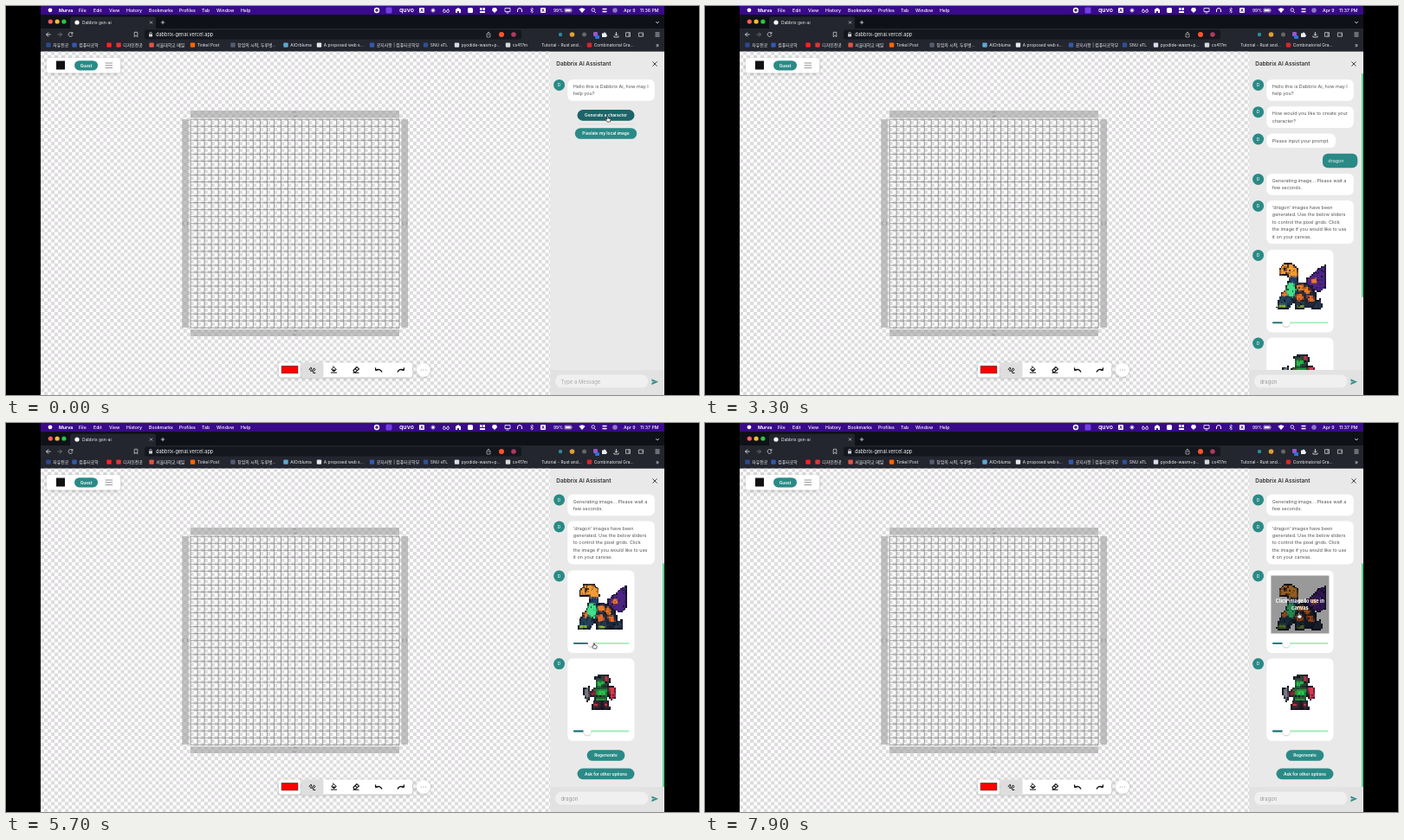
An HTML page with a canvas that plays this animation: 800 by 450 pixels, repeating every 8 s.

```html
<!DOCTYPE html>
<html lang="en">
<head>
<meta charset="utf-8">
<title>Pixel assistant</title>
<style>
html, body { margin: 0; width: 100%; height: 100%; overflow: hidden; background: #000; }
canvas { display: block; width: 800px; height: 450px; }
</style>
</head>
<body>
<canvas id="stage" width="800" height="450"></canvas>
<script>
const FONT = 'Inter, "Noto Sans CJK KR", "Noto Sans CJK", sans-serif';
const TEAL = '#2a8a86', DARK_TEAL = '#1c6468';
const LOOP = 8000;
const PAGE_TOP = 52.64;
const screen = document.getElementById('stage').getContext('2d');
let c = screen;

function layer(w, h) {
  const el = document.createElement('canvas');
  el.width = w;
  el.height = h;
  return el.getContext('2d', { willReadFrequently: true });
}
function rect(x, y, w, h, color) {
  c.fillStyle = color;
  c.fillRect(x, y, w, h);
}
function round(x, y, w, h, r, color) {
  c.fillStyle = color;
  c.beginPath();
  c.roundRect(x, y, w, h, r);
  c.fill();
}
function dot(x, y, r, color) {
  c.fillStyle = color;
  c.beginPath();
  c.arc(x, y, r, 0, 7);
  c.fill();
}
function line(path, color, width = 0.8, x = 0, y = 0) {
  c.save();
  c.translate(x, y);
  c.strokeStyle = color;
  c.lineWidth = width;
  c.stroke(new Path2D(path));
  c.restore();
}
function shape(path, color, x = 0, y = 0) {
  c.save();
  c.translate(x, y);
  c.fillStyle = color;
  c.fill(new Path2D(path));
  c.restore();
}
function text(s, x, y, size, color, weight = 400, align = 'left') {
  c.font = `${weight} ${size}px ${FONT}`;
  c.fillStyle = color;
  c.textAlign = align;
  c.textBaseline = 'alphabetic';
  c.fillText(s, x, y + size * 0.36);
}
function shadowed(blur, draw) {
  c.save();
  c.shadowColor = 'rgba(0,0,0,.22)';
  c.shadowBlur = blur;
  c.shadowOffsetY = 1;
  draw();
  c.restore();
}

// Browser and page, drawn once

function menuBar() {
  rect(40, 0, 720, 10, '#390a8a');
  dot(51, 4.8, 2.4, '#fff');
  text('Murva', 61, 4.8, 5.2, '#fff', 700);
  const items = { File: 84, Edit: 101, View: 119, History: 139, Bookmarks: 165, Profiles: 200, Tab: 226, Window: 243, Help: 271 };
  for (const name in items) text(name, items[name], 4.8, 5.2, '#fff', 500);
  dot(428, 5, 3.2, '#fff');
  dot(428, 5, 1.8, '#443070');
  round(438.5, 1.5, 7, 7, 1.5, '#7040e0');
  text('quvo', 454, 4.8, 7, '#fff', 600);
  for (const x of [480, 620]) {
    round(x - 3, 2, 6, 6, 1, '#fff');
    text('A', x, 5, 4.8, '#390a8a', 600, 'center');
  }
  dot(493, 5, 1.5, '#fff');
  line('M-3 0H3M0-3V3M-2-2L2 2M2-2L-2 2', '#fff', 0.5, 493, 5);
  line('M-3.5 1a1.5 1.5 0 1 0 3 0a1.5 1.5 0 1 0-3 0M.5 1a1.5 1.5 0 1 0 3 0a1.5 1.5 0 1 0-3 0M-3 0L-2-2M3 0L2-2', '#fff', 0.7, 508, 5);
  shape('M-3-1L0-3L3-1V3H1V1H-1V3H-3Z', '#fff', 522, 5);
  shape('M-3 1H3V3H-3ZM-3-3H-.5V0H-3ZM.5-3H3V0H.5Z', '#fff', 550, 5);
  shape('M-2-3H2L3 0L0 3L-3 0Z', '#fff', 564, 5);
  round(533, 2, 6, 6, 1.5, '#fff');
  line('M-3-2.5H3V1.5H-3ZM-1.5 3H1.5', '#fff', 0.8, 579, 5);
  line('M-2.5 2V0a2.5 2.5 0 0 1 5 0V2', '#fff', 1, 593, 5);
  line('M-1.7-1.6L1.7 1.6L0 3V-3L1.7-1.6L-1.7 1.6', '#fff', 0.6, 607, 5);
  text('99%', 632, 4.8, 4.9, '#fff', 500);
  line('M-4-2H3.5V2H-4ZM4.5-.7V.7', '#ccc', 0.6, 649, 5);
  rect(645.7, 3.7, 6, 2.6, '#fff');
  shape('M-3.6-1.2Q0-4.4 3.6-1.2L0 3Z', '#fff', 665, 5);
  line('M1.3 1.3L3 3M-2-.5a1.8 1.8 0 1 0 3.6 0a1.8 1.8 0 1 0-3.6 0', '#fff', 0.8, 678, 5);
  line('M-2.5-1.5H2.5M-2.5 1.5H2.5', '#fff', 1.6, 691, 5);
  dot(703, 5, 2.8, '#8a78c8');
}

function addressBar() {
  rect(40, 10, 720, 16, '#0f1118');
  ['#ff5f57', '#febc2e', '#28c840'].forEach((color, i) => dot(51.3 + i * 7.8, 18, 2.6, color));
  round(74, 12.5, 99, 16, 3, '#23252f');
  rect(40, 26, 720, PAGE_TOP - 26, '#23252f');
  dot(82, 19, 2.6, '#fff');
  text('Dabbrix gen-ai', 88, 19, 4.8, '#eee');
  line('M-1.5-1.5L1.5 1.5M1.5-1.5L-1.5 1.5', '#ddd', 0.7, 167.5, 19);
  line('M-2.2 0H2.2M0-2.2V2.2', '#ddd', 0.8, 181, 19);
  line('M-2-1L0 1L2-1', '#ddd', 0.8, 752, 19);
  line('M2.5 0H-2.5M0-2.5L-2.5 0L0 2.5', '#ddd', 0.9, 49, 33);
  line('M-2.5 0H2.5M0-2.5L2.5 0L0 2.5', '#777', 0.9, 62, 33);
  line('M2-1.5a2.4 2.4 0 1 0 .4 2M2.4-3V-1H.5', '#ddd', 0.8, 74.5, 33);
  line('M-1.8-2.7H1.8V2.7L0 1.2L-1.8 2.7Z', '#ccc', 0.8, 150, 33);
  round(160, 27.5, 435, 11, 2.5, '#15171e');
  rect(165, 32.3, 4, 3.2, '#ccc');
  line('M-1.2 0V-1a1.2 1.2 0 0 1 2.4 0V0', '#ccc', 0.7, 167, 32.5);
  text('dabbrix-genai.vercel.app', 173, 32.8, 5.6, '#f0f0f0');
  line('M-1-1H-2V3H2V-1H1M0 1V-3M-1.3-1.8L0-3L1.3-1.8', '#bbb', 0.7, 557, 33);
  dot(572, 33, 3, '#fb542b');
  dot(586, 33, 2.8, '#b0395f');
  dot(640, 33, 2.2, '#2a8c98');
  dot(653.5, 33, 2.8, '#e0a030');
  dot(667.5, 33, 2.5, '#666');
  round(678, 30, 5, 5, 1, '#9a55c8');
  round(680, 34, 5, 4, 1, '#2a72e0');
  shape('M-3-1.5H-1a1 1 0 1 1 2 0H2V.3a1 1 0 1 1 0 2V3H-3Z', '#eee', 691, 33);
  line('M0-3V1M-1.8-.6L0 1.2L1.8-.6M-2.6 1.5V3H2.6V1.5', '#eee', 0.8, 704.5, 33);
  line('M-2.5-2.3H2.5V2.3H-2.5ZM1-2.3V2.3', '#ccc', 0.8, 718, 33);
  line('M-2.6-2H2.6V2.2H-2.6ZM.8 0H2.6', '#ccc', 0.8, 733, 33);
  line('M-2.5-2H2.5M-2.5 0H2.5M-2.5 2H2.5', '#ddd', 0.8, 752, 33);

  const bookmarks = [
    ['자유전공', 49, '#2b4a8c'], ['컴퓨터공학', 79, '#3559a8'], ['', 119, '#f22'], ['디자인전공', 130, '#e03535'],
    ['서울대학교 메일', 168, '#e05545'], ['Tinkel Post', 215.5, '#ff6600'], ['창업의 시작, 두루벗...', 262, '#555c70'],
    ['AIOrbluma', 323, '#60a8d0'], ['A proposed web s...', 361.5, '#e8e8e8'], ['공지사항 | 컴퓨터공학부', 422.5, '#3559a8'],
    ['SNU eTL', 484.5, '#305090'], ['pyodide-wasm+p...', 520.5, '#d8dce8'], ['cs417m', 579.5, '#d8d8d8'],
    ['Tutorial - Rust and...', 613, ''], ['Combinatorial Gra...', 673.5, '#d02a2a']
  ];
  for (const [name, x, color] of bookmarks) {
    if (color) round(x - 2.7, 42.4, 5.4, 5.4, 1, color);
    text(name, x + 5.3, 45, 4.9, '#f0f0f0');
  }
  text('»', 752, 45, 7, '#ddd', 400, 'center');
}

function editor() {
  rect(40, PAGE_TOP, 588, 450 - PAGE_TOP, '#fff');
  const half = 4.018;
  for (let j = 0; j < 99; j++)
    for (let i = (j + 1) % 2; i < 147; i += 2) rect(40 + i * half, PAGE_TOP + j * half, half, half, '#dddbdd');

  const bar = 'rgba(160,160,160,.62)';
  rect(213, 121, 241, 8.5, bar);
  rect(213, 374.3, 241, 7.7, bar);
  rect(203.2, 131, 7.8, 241, bar);
  rect(456.3, 131, 7.8, 241, bar);
  for (const y of [125.2, 378]) line('M-2-1.8L0-2.8L2-1.8M-2 1.8L0 2.8L2 1.8', '#777', 0.6, 333.5, y);
  for (const x of [207.2, 460.2]) line('M-1.8-2L-2.8 0L-1.8 2M1.8-2L2.8 0L1.8 2', '#777', 0.6, x, 251.5);
  for (let i = 0; i <= 30; i++) {
    const p = i * 8.035;
    line(`M${213 + p} 131V372.5M213 ${131.2 + p}H454`, '#686868', 0.62);
  }

  shadowed(4, () => round(47, 60, 85, 17.5, 3, '#fff'));
  round(58, 63.5, 10, 10, 0, '#111');
  round(79, 63.2, 27, 11.2, 5.6, TEAL);
  text('Guest', 92.5, 68.8, 4.8, '#fff', 600, 'center');
  line('M114.5 66H123M114.5 68.8H123M114.5 71.6H123', '#777', 0.8);

  shadowed(4, () => {
    round(315, 412.5, 25.5, 17, 2, '#fff');
    round(341, 412.5, 128, 17, 2, '#fff');
    dot(482, 421, 8, '#fff');
  });
  round(341, 412.5, 25.5, 17, 2, '#dedede');
  rect(317.8, 416.2, 19.4, 9, '#333');
  rect(318.3, 416.7, 18.4, 8, '#f00');
  const ink = '#111';
  line('M-3.5 0C-2-4 0-3 -1-1S-3 2 0 1M0 1L2-2L3.5-.6L1 2.5ZM1 3.5H3.8', ink, 1, 353.5, 421);
  line('M-2.8 0L0-2.8L2.8 0L0 2.2ZM-1.5-3.8L0-2.8M-3.6 3.6H3.6', ink, 1, 378.5, 420.5);
  shape('M-2.8 0H2.8L0 2.4Z', ink, 378.5, 420.5);
  line('M-3 1L1-3L3.5-.6L-.5 3H-2ZM-1-1L1.6 1.4M-3.5 3.8H3.5', ink, 1.1, 404, 420.5);
  line('M4 2.5Q2-2-3 0M-3.5-2.6L-3.2.3L-.3 0', ink, 1.3, 430, 421);
  line('M-4 2.5Q-2-2 3 0M3.5-2.6L3.2.3L.3 0', ink, 1.3, 456, 421);
  for (const x of [479.3, 482, 484.7]) dot(x, 421, 0.6, '#888');
}

// Pixel art: polygons on a 67-unit square, reduced to n x n cells

const dragon = [
  ['M62 13L56 16L50 22L42 28L42 33L48 39L56 42L62 37Z', '#4c2482'],
  ['M26 37L34 32L42 34L50 44L52 56L45 60L31 60L25 50Z', '#20283c'],
  ['M10 17L15 11L24 11L30 16L31 24L28 28L21 27L20 22L10 23Z', '#f29a36'],
  ['M22 25L29 25L31 32L27 38L20 36Z', '#23406a'],
  ['M20 32L26 31L29 40L26 50L20 48L17 42Z', '#3fe088'],
  ['M10 50L18 44L25 54L20 61L8 61Z', '#24425a'],
  ['M29 36L36 34L39 40L32 42ZM41 36L46 41L43 46L38 42Z', '#ef7a26'],
  ['M28 46L35 44L38 51L31 54ZM41 47L48 46L50 54L44 54Z', '#e0692a'],
  ['M30 54H39V61H29ZM50 57L57 52L58 61H48Z', '#263a4c'],
  ['M9 57H17V61H8ZM31 58H38V61H31Z', '#86b336'],
  ['M12 45L17 41L19 46L15 49ZM46 29L51 26L53 32L48 34Z', '#ef7a26'],
  ['M15 14H18V18H15Z', '#20202e']
];
const warrior = [
  ['M28 16L32 14L40 14L43 19L42 27H29Z', '#2c4038'],
  ['M38 15H42V20H38Z', '#d02e48'],
  ['M29 20H37V24H34V27H29Z', '#28b548'],
  ['M25 29H42L40 43H28Z', '#26903e'],
  ['M43 28L49 28L50 39L45 41Z', '#d83a50'],
  ['M21 33L27 30L28 36L22 38Z', '#8c2438'],
  ['M15 29L19 28L20 40L18 43L15 37Z', '#787c80'],
  ['M26 43H33V53H23ZM36 43H41L43 53H36Z', '#30282c'],
  ['M25 46H30V49H25ZM37 46H41V49H37Z', '#b83446'],
  ['M31 32H38V36H31Z', '#30cc50'],
  ['M27 38H40V40H27Z', '#202a26']
];
const hash = (x, y) => { const v = Math.sin(x * 12.99 + y * 78.23) * 43758.5; return v - Math.floor(v); };
const sprites = new Map();

function sprite(name, parts, n) {
  const key = name + n;
  if (sprites.has(key)) return sprites.get(key);
  const g = layer(n, n);
  g.scale(n / 67, n / 67);
  g.strokeStyle = '#17182a';
  g.lineWidth = 2.4;
  for (const [path] of parts) g.stroke(new Path2D(path));
  for (const [path, color] of parts) {
    g.fillStyle = color;
    g.fill(new Path2D(path));
  }
  const image = g.getImageData(0, 0, n, n), d = image.data;
  for (let i = 0; i < d.length; i += 4) {
    d[i + 3] = d[i + 3] > 120 ? 255 : 0;
    const cell = i / 4, h = hash(cell % n, Math.floor(cell / n));
    const shade = h < 0.05 ? 0.35 : h < 0.2 ? 0.75 : 1;
    for (let k = 0; k < 3; k++) d[i + k] *= shade;
  }
  g.putImageData(image, 0, 0);
  sprites.set(key, g.canvas);
  return g.canvas;
}

// Chat panel

function avatar(y) {
  dot(638.6, y + 6.4, 6.5, TEAL);
  text('D', 638.6, y + 6.4, 4.8, '#e8f4f3', 500, 'center');
}
function message(y, lines, width = 100.5) {
  avatar(y);
  round(648.3, y, width, lines.length * 8.4 + 8, 6, '#fff');
  lines.forEach((s, i) => text(s, 654.8, y + 8.1 + i * 8.4, 5.45, '#555'));
}
function button(label, y, pointer) {
  c.font = `600 4.82px ${FONT}`;
  const w = c.measureText(label).width + 17;
  const hover = pointer && Math.abs(pointer.x - 692.5) < w / 2 && Math.abs(pointer.y - y) < 7;
  round(692.5 - w / 2, y - 6.3, w, 12.6, 6.3, hover ? DARK_TEAL : TEAL);
  text(label, 692.5, y, 4.82, '#fff', 600, 'center');
}
function card(y, name, parts, thumb, hover) {
  avatar(y);
  round(648.3, y, 77.2, 95.5, 6, '#fff');
  const n = Math.round(20 + 64 * (thumb - 655) / 64);
  c.imageSmoothingEnabled = false;
  c.drawImage(sprite(name, parts, n), 653.4, y + 6, 67, 67);
  if (hover) {
    rect(653.4, y + 6, 67, 67, 'rgba(0,0,0,.4)');
    text('Click image to use in', 686.9, y + 35, 5.6, '#fff', 700, 'center');
    text('canvas', 686.9, y + 43.4, 5.6, '#fff', 700, 'center');
  }
  round(655, y + 83.4, 64.5, 1.8, 0.9, '#a2edb8');
  round(655, y + 83.4, thumb - 655, 1.8, 0.9, '#176a74');
  shadowed(1.5, () => dot(thumb, y + 84.3, 4.6, '#fff'));
}

const clamp = v => Math.max(0, Math.min(1, v));
const ease = v => v * v * (3 - 2 * v);
const ramp = (t, a, b) => ease(clamp((t - a) / (b - a)));

const route = [
  [0, 695, 131], [550, 695, 131], [950, 694, 161], [1500, 694, 161], [1800, 690, 434],
  [4900, 692, 300], [5250, 674, 258], [5450, 674, 258], [6450, 707, 258], [6650, 707, 258],
  [7200, 674, 258], [7300, 674, 258], [7600, 686, 223], [LOOP, 686, 223]
];
function pointerAt(t) {
  const i = route.findIndex(k => k[0] > t);
  const [a, ax, ay] = route[i - 1], [b, bx, by] = route[i];
  const p = ramp(t, a, b);
  return { x: ax + (bx - ax) * p, y: ay + (by - ay) * p };
}

function hand({ x, y }) {
  const path = 'M-1-3.2Q-.3-4 .3-3.2V-1Q3.2-.9 3 .6L2.4 3H-1L-2.8.4Q-2.6-.6-1 .2Z';
  shape(path, '#fff', x, y);
  line(path, '#222', 0.7, x, y);
}

function panel(t, pointer) {
  const results = t >= 3300;
  const scroll = 90 * ramp(t, 3300, 3600) + 21.5 * ramp(t, 3850, 4250);
  const focused = t >= 1800 && t < 2700;
  rect(628, PAGE_TOP, 132, 450 - PAGE_TOP, '#e9e9e9');

  c.save();
  c.beginPath();
  c.rect(628, 78, 132, 343);
  c.clip();
  c.translate(0, -scroll);
  message(85, ['Hello this is Dabbrix Ai, how may I', 'help you?']);
  if (t < 500) {
    button('Generate a character', 126.4, pointer);
    line('M660 136.5H726', '#d2d2d2', 0.5);
    button('Pixelate my local image', 147.5);
  } else {
    message(116.3, ['How would you like to create your', 'character?']);
    if (t < 1500) {
      button('Generate character with prompt', 157.6, pointer);
      button('Extract character from my image', 179);
    } else {
      message(147.6, ['Please input your prompt.'], 79.7);
    }
  }
  if (t >= 2700) {
    round(713, 170.8, 40.3, 16.4, 6, TEAL);
    text('dragon', 719.3, 179, 5.45, '#e8f4f3');
    message(194, ['Generating image... Please wait a', 'few seconds.']);
  }
  if (results) {
    message(225, ["'dragon' images have been", 'generated. Use the below sliders', 'to control the pixel grids. Click', 'the image if you would like to use', 'it on your canvas.']);
    const thumb = t > 5450 && t < 7200 ? pointer.x - 3 : 671;
    card(282, 'dragon', dragon, thumb, t >= 7500);
    card(383.7, 'warrior', warrior, 671, false);
    button('Regenerate', 496, pointer);
    button('Ask for other options', 517.4, pointer);
  }
  c.restore();

  if (results) round(758, 78 + scroll * 0.755, 2, 259, 1, '#55d68c');
  text('Dabbrix AI Assistant', 635.3, 66.6, 6.45, '#333', 600);
  line('M-2.6-2.6L2.6 2.6M2.6-2.6L-2.6 2.6', '#333', 0.9, 749, 67);

  rect(628, 421, 132, 29, focused ? '#d6d6d6' : '#e2e2e2');
  round(634, 426.6, 107.5, 15, 7.5, focused ? '#fff' : '#f0f0f0');
  const typed = 'dragon'.slice(0, Math.floor(clamp((t - 1850) / 550) * 6));
  if (focused && typed) text(typed, 640.5, 434.4, 5.9, '#444');
  else if (t < 2700) text('Type a Message', 640.5, 434.4, 5.9, '#aaa');
  else text('dragon', 640.5, 434.4, 5.9, '#999');
  if (focused) {
    c.font = `400 5.9px ${FONT}`;
    rect(641 + c.measureText(typed).width, 431, 0.6, 6.8, '#222');
  }
  shape('M-3.8-3.4L4 0L-3.8 3.4L-3.2.6L1 0L-3.2-.6Z', TEAL, 749, 434.8);
}

const page = layer(800, 450);
c = page;
rect(0, 0, 800, 450, '#000');
menuBar();
addressBar();
editor();
c = screen;

function frame(now) {
  const t = now % LOOP;
  const pointer = pointerAt(t);
  c.drawImage(page.canvas, 0, 0);
  text('Apr 9', 713, 4.8, 5.2, '#fff', 500);
  text(t < 2800 ? '11:36 PM' : '11:37 PM', 753.5, 4.8, 5.2, '#fff', 500, 'right');
  panel(t, pointer);
  if (t < 1850 || t >= 4950) hand(pointer);
  requestAnimationFrame(frame);
}
requestAnimationFrame(frame);
</script>
</body>
</html>
```
